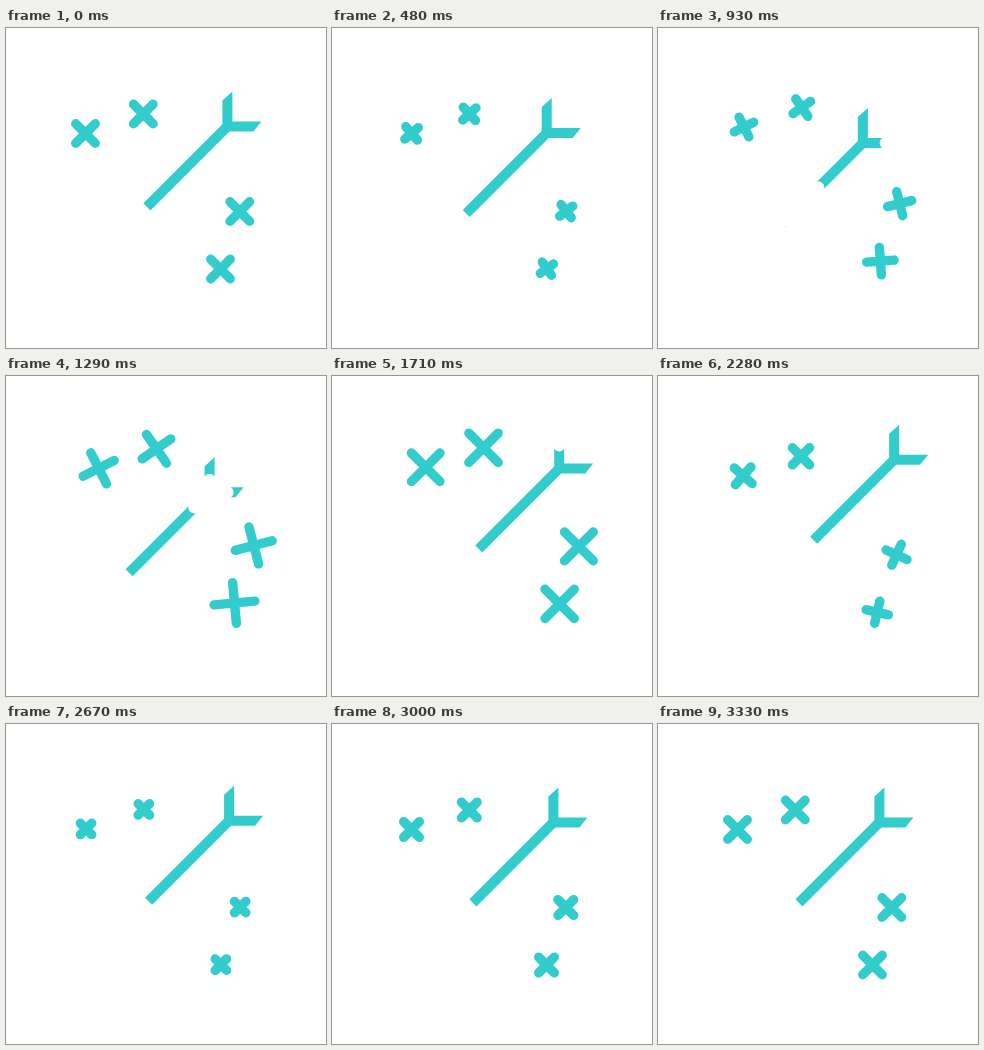
An HTML page for the animation above (3390 ms loop, 320x320 px).

```html
<!DOCTYPE html>
<html lang="en">
<head>
<meta charset="utf-8">
<title>Sword and sparks</title>
<style>
  html, body { margin: 0; width: 100%; height: 100%; overflow: hidden; background: #fff; }
  svg { display: block; width: 100vw; height: 100vh; }
</style>
</head>
<body>
<svg viewBox="0 0 320 320">
  <g id="blade">
    <path d="M-80.5 80.5L0 0" stroke="#33cccc" stroke-width="10"/>
    <path d="M-5 -26L5 -35V-5H34L26 5H-5Z" fill="#33cccc"/>
    <g fill="none" stroke="#fff" stroke-width="12" stroke-linecap="round" stroke-linejoin="round">
      <path id="shaftGlint" d="M-80.5 80.5L0 0"/>
      <path id="tipGlint" d="M34 0H0V-35"/>
    </g>
  </g>
  <g id="sparks" stroke="#33cccc" stroke-width="9.4" stroke-linecap="round"></g>
</svg>
<script>
const LOOP = 3390, STEP = 30;
const $ = id => document.getElementById(id);
const clamp = (v, lo, hi) => Math.min(hi, Math.max(lo, v));

// Eased value through [time, value] keys.
function track(t, keys) {
  if (t <= keys[0][0]) return keys[0][1];
  for (let i = 1; i < keys.length; i++) {
    const [t0, a] = keys[i - 1], [t1, b] = keys[i];
    if (t <= t1) {
      const p = (t - t0) / (t1 - t0);
      return a + (b - a) * p * p * (3 - 2 * p);
    }
  }
  return keys[keys.length - 1][1];
}

const bladeShift = [[0, 0], [1200, -19], [2045, 19], [2810, 0]];
const upperShift = [[430, 0], [1530, 15], [2820, 0]];
const lowerShift = [[380, 0], [1430, 14.7], [2800, 0]];

// Position, drift, swing out, swing back, delay, largest arm
const sparks = [
  { x: 79.5, y: 105.5, drift: upperShift, out: 21.5, back: 4, lag: 130, size: 20.2 },
  { x: 137.3, y: 86, drift: upperShift, out: 12, back: 0, lag: 150, size: 20.8 },
  { x: 233.8, y: 183.5, drift: lowerShift, out: 36, back: 21, lag: 50, size: 20.8 },
  { x: 214.5, y: 241, drift: lowerShift, out: 47, back: 33, lag: 0, size: 21.6 }
];

for (const s of sparks) {
  s.el = document.createElementNS("http://www.w3.org/2000/svg", "path");
  $("sparks").append(s.el);
  s.turn = [[200, -45], [1150, s.out - 45], [1710, -45], [2230, -45 - s.back], [2700, -45]];
  s.arm = [[0, 13.8], [500 + s.lag, 8], [1460 + s.lag, s.size], [1540 + s.lag, s.size],
           [2640, 8], [3330, 13.8]];
}

// White dash running along a stroke.
function glint(el, length, t, head, tail, speed) {
  const from = clamp((t - tail) * speed, 0, length);
  const to = clamp((t - head) * speed, 0, length);
  el.style.display = to > from ? "" : "none";
  el.setAttribute("stroke-dasharray", `${to - from} 999`);
  el.setAttribute("stroke-dashoffset", -from);
}

function draw(t) {
  const d = track(t, bladeShift);
  $("blade").setAttribute("transform", `translate(${221.4 + d} ${98.4 - d})`);
  glint($("shaftGlint"), 113.8, t, 723, 915, 0.246);
  glint($("tipGlint"), 69, t, 815, 1126, 0.0976);

  for (const s of sparks) {
    const m = track(t, s.drift), r = track(t, s.arm);
    s.el.setAttribute("d", `M${-r} 0H${r}M0 ${-r}V${r}`);
    s.el.setAttribute("transform",
      `translate(${s.x + m} ${s.y - m}) rotate(${track(t, s.turn)})`);
  }
}

const start = performance.now();
function tick() {
  const t = (performance.now() - start) % LOOP;
  draw(Math.min(LOOP - 2 * STEP, Math.floor(t / STEP) * STEP));
  requestAnimationFrame(tick);
}
tick();
</script>
</body>
</html>
```
